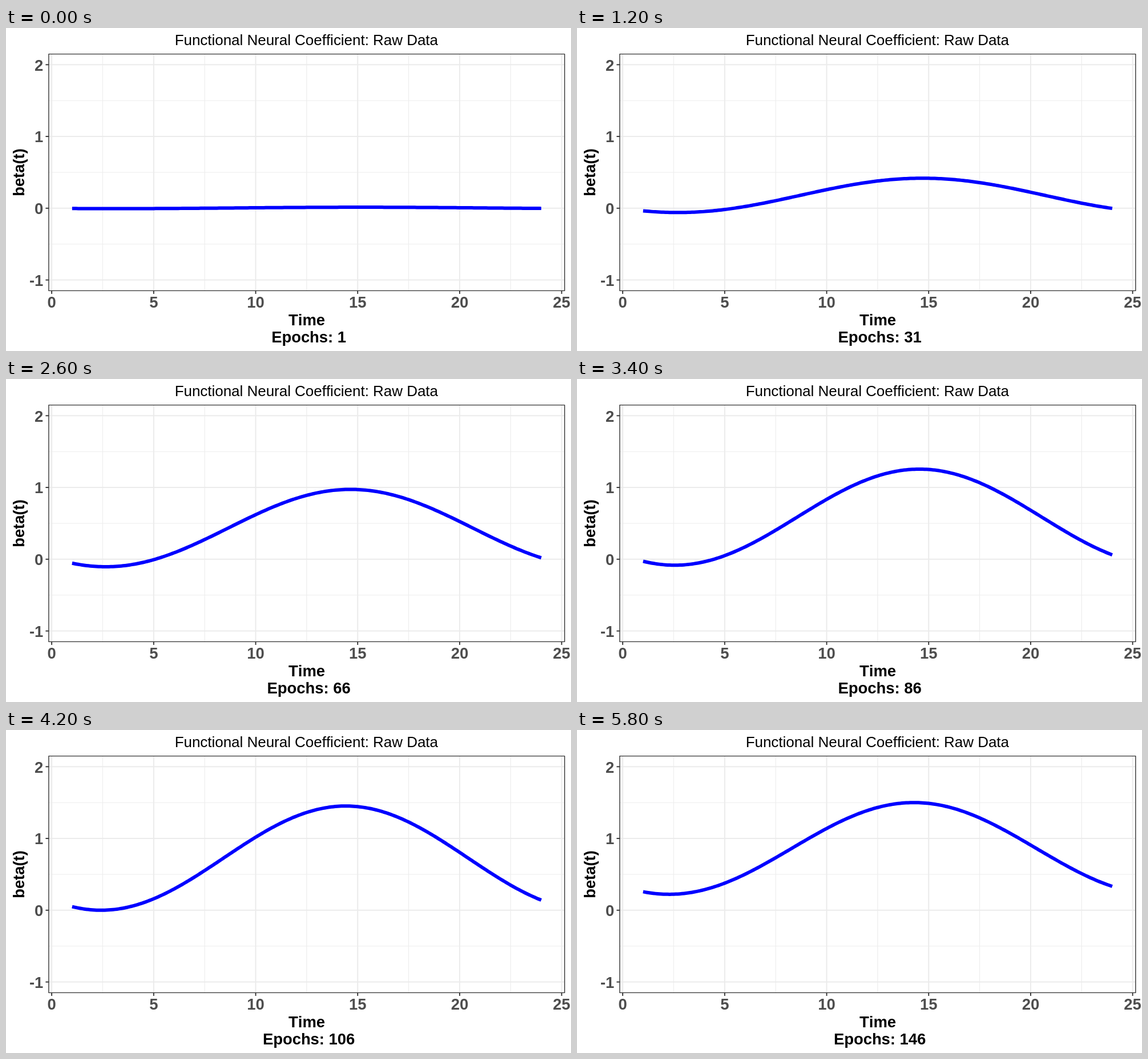
An HTML page with a canvas that plays this animation: 990x566 px, repeating every 6000 ms.

```html
<!DOCTYPE html>
<html lang="en">
<head>
<meta charset="utf-8">
<title>Functional Neural Coefficient</title>
<style>
  html, body { margin: 0; width: 100%; height: 100%; overflow: hidden; background: #fff; }
  canvas { display: block; width: 990px; height: 566px; }
</style>
</head>
<body>
<canvas id="plot" width="990" height="566"></canvas>
<script>
const ctx = document.getElementById('plot').getContext('2d');
const FAMILY = '"Liberation Sans", Arial, sans-serif';
const BOLD = 'bold 27.4px ' + FAMILY;
const LOOP = 6000, STEP = 200;
const box = { l: 74.9, r: 978.8, t: 45.6, b: 460.4 };
const px = t => 80.1 + 35.74 * t;
const py = v => 315.8 - 125.75 * v;

// Daily wave per epoch: [epoch, centre, amplitude, peak hour]
const fits = [
  [1, 0.004, 0.0097, 15.15],
  [31, 0.179, 0.239, 14.7],
  [66, 0.434, 0.539, 14.65],
  [86, 0.586, 0.669, 14.55],
  [106, 0.726, 0.726, 14.42],
  [126, 0.818, 0.697, 14.37],
  [146, 0.861, 0.639, 14.28]
];
const W = Math.PI / 12;
const keys = fits.map(([e, c, a, p]) => ({ e, k: [c, a * Math.cos(W * p), a * Math.sin(W * p)] }));

const slope = (i, j, n) => (keys[j].k[n] - keys[i].k[n]) / (keys[j].e - keys[i].e);

function tangent(i, n) {
  const last = keys.length - 1;
  if (i === 0) return slope(0, 1, n);
  if (i === last) return slope(last - 1, last, n);
  const h0 = keys[i].e - keys[i - 1].e, h1 = keys[i + 1].e - keys[i].e;
  return (h1 * slope(i - 1, i, n) + h0 * slope(i, i + 1, n)) / (h0 + h1);
}

// Smooth cubic through the fitted coefficients
function weights(epoch) {
  let i = 0;
  while (i < keys.length - 2 && epoch > keys[i + 1].e) i++;
  const a = keys[i], b = keys[i + 1], h = b.e - a.e;
  const u = (epoch - a.e) / h, v = 1 - u;
  return [0, 1, 2].map(n =>
    v * v * (1 + 2 * u) * a.k[n] + u * u * (3 - 2 * u) * b.k[n] +
    h * u * v * (v * tangent(i, n) - u * tangent(i + 1, n)));
}

function line(x1, y1, x2, y2, color, width) {
  ctx.strokeStyle = color;
  ctx.lineWidth = width;
  ctx.beginPath();
  ctx.moveTo(x1, y1);
  ctx.lineTo(x2, y2);
  ctx.stroke();
}

function text(str, x, y, font, color, align = 'center') {
  ctx.font = font;
  ctx.fillStyle = color;
  ctx.textAlign = align;
  ctx.fillText(str, x, y);
}

const vline = (t, color, width) => line(px(t), box.t, px(t), box.b, color, width);
const hline = (v, color, width) => line(box.l, py(v), box.r, py(v), color, width);

function drawGrid() {
  for (let t = 2.5; t < 25; t += 5) vline(t, '#ededed', 1.2);
  for (let v = -0.5; v < 2; v++) hline(v, '#ededed', 1.1);
  for (let t = 0; t <= 25; t += 5) vline(t, '#ebebeb', 2);
  for (let v = -1; v <= 2; v++) hline(v, '#ebebeb', 2);
}

function drawCurve(epoch) {
  const [c, a, b] = weights(epoch);
  ctx.strokeStyle = '#0000ff';
  ctx.lineWidth = 6;
  ctx.lineJoin = 'round';
  ctx.beginPath();
  for (let i = 0; i <= 230; i++) {
    const t = 1 + i / 10;
    ctx.lineTo(px(t), py(c + a * Math.cos(W * t) + b * Math.sin(W * t)));
  }
  ctx.stroke();
}

function drawAxes(epoch) {
  ctx.strokeStyle = '#333';
  ctx.lineWidth = 1.4;
  ctx.strokeRect(box.l, box.t, box.r - box.l, box.b - box.t);
  for (let t = 0; t <= 25; t += 5) {
    line(px(t), box.b, px(t), box.b + 5.5, '#333', 1.9);
    text(t, px(t), 490.3, BOLD, '#4d4d4d');
  }
  for (let v = -1; v <= 2; v++) {
    line(box.l - 5.5, py(v), box.l, py(v), '#333', 1.9);
    text(v, 65.3, py(v) + 10.3, BOLD, '#4d4d4d', 'right');
  }
  text('Functional Neural Coefficient: Raw Data', 526.3, 30.2, '25.95px ' + FAMILY, '#000');
  text('Time', 527, 521.3, BOLD, '#000');
  text('Epochs: ' + epoch, 530.6, 551, BOLD, '#000');
  ctx.save();
  ctx.translate(31.8, 253);
  ctx.rotate(-Math.PI / 2);
  text('beta(t)', 0, 0, BOLD, '#000');
  ctx.restore();
}

function draw(ms) {
  const epoch = 1 + 5 * Math.floor((ms % LOOP) / STEP);
  ctx.fillStyle = '#fff';
  ctx.fillRect(0, 0, 990, 566);
  ctx.fontKerning = 'none';
  drawGrid();
  drawCurve(epoch);
  drawAxes(epoch);
}

const start = performance.now();
function tick() {
  draw(performance.now() - start);
  requestAnimationFrame(tick);
}
tick();
</script>
</body>
</html>
```
